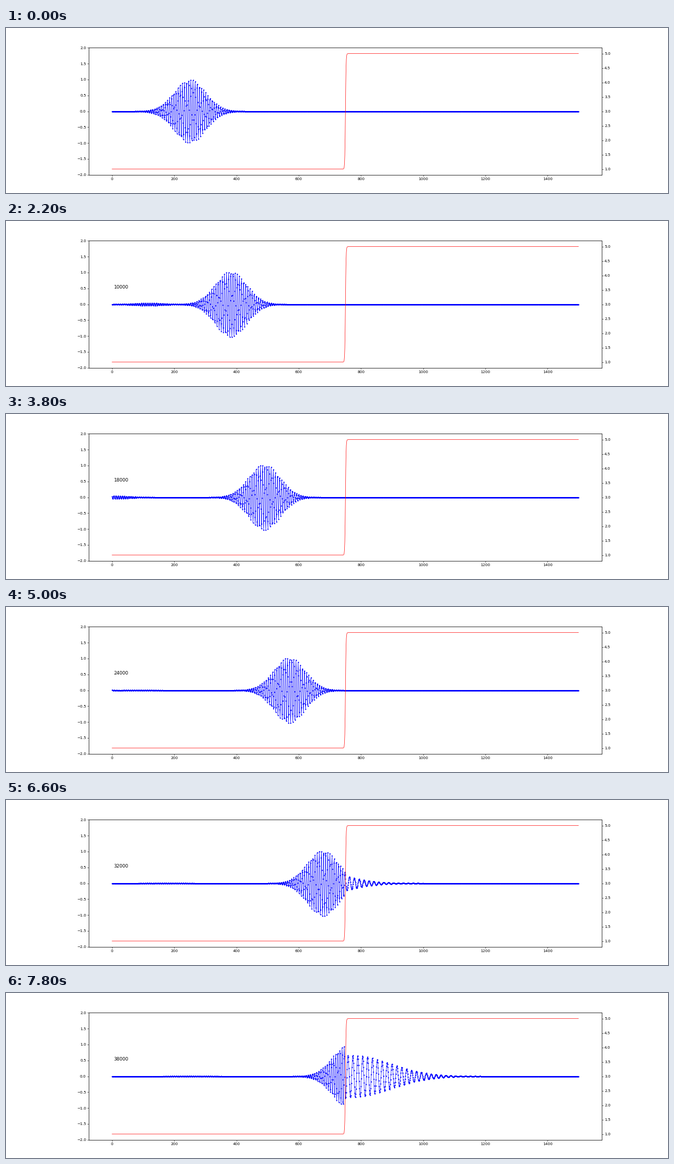
These frames come from a looping animation (1280 px wide and 320 px high, 8 s). A matplotlib script:

```python
"""A wave packet on a spring chain that runs into a stiffer section."""
import numpy as np
import matplotlib.pyplot as plt
from matplotlib.animation import FuncAnimation

FRAMES = 40
INTERVAL = 200            # ms
STEPS = 1000              # integration steps per frame
LAG = 186                 # steps missing from the first batch
DT = 0.015

N = 1500
CENTER, WIDTH = 250, 50   # packet envelope
WAVENUMBER, CREST = 0.92, 260
LAUNCH_SPEED = 1.04

x = np.arange(N)


def stiffness(pos):
    """Smooth step from 1 to 5 in the middle of the chain."""
    return 3 + 2 * np.tanh((pos - N / 2) / 2)


def packet():
    """Displacement and velocity of a packet that travels right."""
    envelope = np.exp(-((x - CENTER) / WIDTH) ** 2 / 2)
    phase = WAVENUMBER * (x - CREST)
    u = envelope * np.cos(phase)
    slope = (-(x - CENTER) / WIDTH ** 2 * u
             - WAVENUMBER * envelope * np.sin(phase))
    return u, -LAUNCH_SPEED * slope


def simulate():
    """Displacement of the chain for every frame."""
    u, v = packet()
    springs = stiffness(x[:-1] + 0.5)
    damping = np.sqrt(springs[[0, -1]])   # ends absorb the wave
    force = np.zeros(N)
    states = [u.copy(), u.copy()]
    for n in range(2, FRAMES):
        for _ in range(STEPS - LAG if n == 2 else STEPS):
            tension = springs * (u[1:] - u[:-1])
            force[1:-1] = tension[1:] - tension[:-1]
            force[0] = tension[0] - damping[0] * v[0]
            force[-1] = -tension[-1] - damping[1] * v[-1]
            v += DT * force
            u += DT * v
        states.append(u.copy())
    return states


states = simulate()

fig, ax = plt.subplots(figsize=(24, 6), dpi=1280 / 24)
wave, = ax.plot(x, states[0], "b.-", linewidth=1, markersize=4)
ax.set_ylim(-2, 2)
label = ax.text(5, 0.5, "", fontsize=12)

ax_right = ax.twinx()
ax_right.plot(x, stiffness(x), "r-", linewidth=1)


def update(n):
    wave.set_ydata(states[n])
    label.set_text(str((n - 1) * STEPS) if n else "")
    return wave, label


anim = FuncAnimation(fig, update, frames=FRAMES, interval=INTERVAL,
                     repeat=True, repeat_delay=0, blit=False)
plt.show()
```
